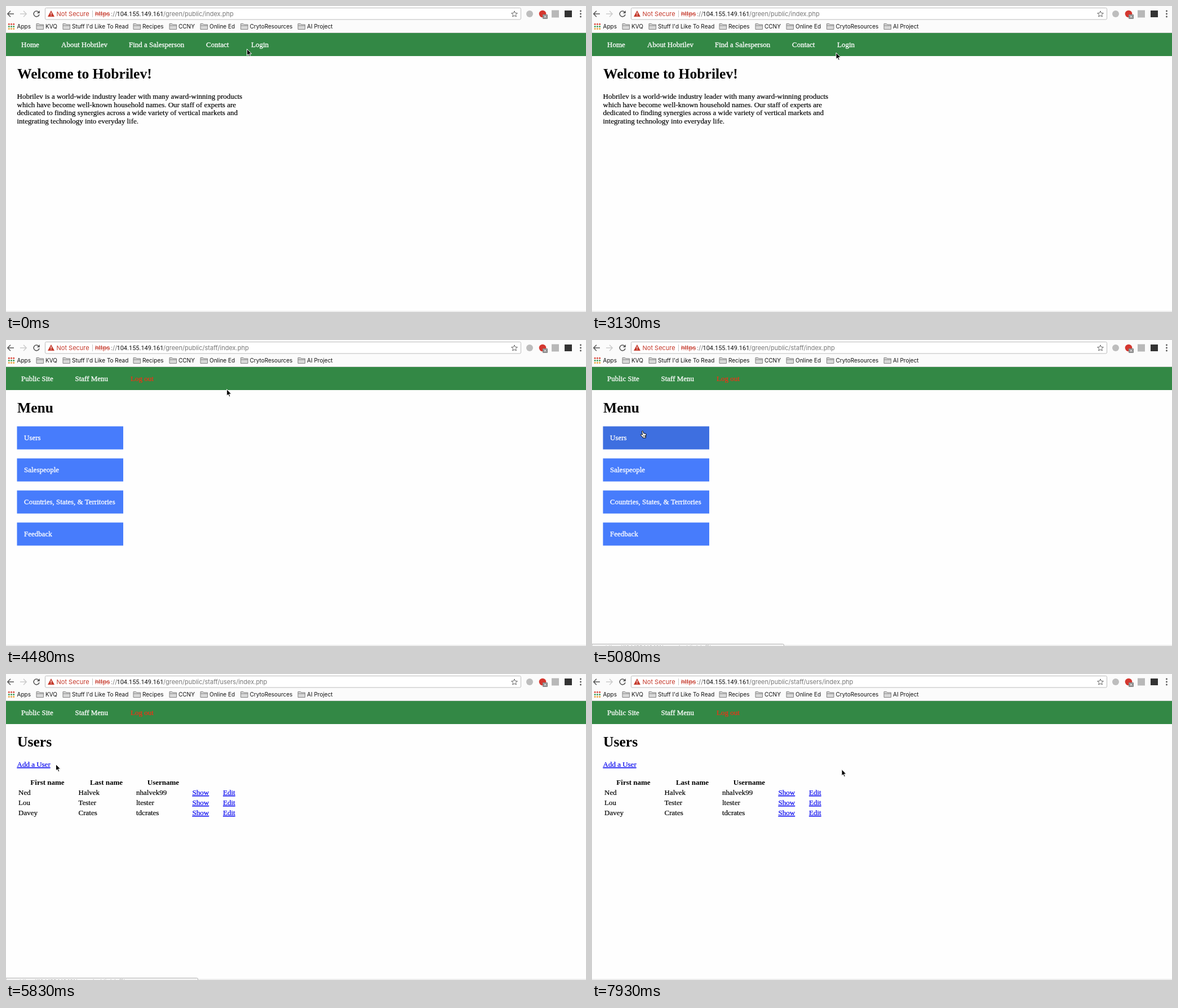
Write an HTML page that moves like this. It is 1029 by 544 pixels and loops after 8 s.

```html
<!DOCTYPE html>
<html lang="en">
<head>
<meta charset="utf-8">
<title>Staff area walkthrough</title>
<style>
html, body { margin: 0; width: 100%; height: 100%; overflow: hidden; background: #fefefe; }
svg { display: block; width: 100vw; height: 100vh; }
text { font: 13px "Liberation Serif", serif; color: #000; fill: currentColor;
  stroke: currentColor; stroke-width: .2; white-space: pre; }
.url { font: 11px Inter, sans-serif; color: #777; stroke: none; }
.host { font: 11px Roboto, sans-serif; color: #111; }
.mark { font: 10px Inter, sans-serif; color: #111; stroke: none; }
.hint { font: 9.6px Inter, sans-serif; color: #aaa; stroke: none; }
.red { color: #c5392b; }
.struck { text-decoration: line-through; }
.h1 { font-size: 25.6px; font-weight: bold; stroke: none; }
.th { font-weight: bold; text-anchor: middle; stroke: none; }
.white { color: #fff; stroke-width: .3; }
.logout { color: #fc2d14; }
.link { color: #0000ee; text-decoration: underline; }
.line { fill: none; stroke: #555; stroke-width: 1.5; }
</style>
</head>
<body>
<svg id="stage" viewBox="0 0 1029 544"></svg>
<script>
const text = (x, y, content, cls = '') =>
  `<text x="${x}" y="${y}" class="${cls}">${content}</text>`;
const rect = (x, y, w, h, fill, more = '') =>
  `<rect x="${x}" y="${y}" width="${w}" height="${h}" fill="${fill}" ${more}/>`;
const circle = (x, y, r, fill) => `<circle cx="${x}" cy="${y}" r="${r}" fill="${fill}"/>`;
const path = (d, more = 'class="line"') => `<path d="${d}" ${more}/>`;
const group = (id, ...parts) => `<g id="${id}">${parts.join('')}</g>`;
const nav = (x, label, cls = 'white') => text(x, 73, label, cls);
const cross = (x, y, r, more) =>
  path(`M${x - r} ${y - r}L${x + r} ${y + r}M${x + r} ${y - r}L${x - r} ${y + r}`, more);

const bookmark = (x, label) => text(x, 40, label, 'mark') +
  `<g transform="translate(${x - 16} 31.5)" fill="#d9d9d9" stroke="#777" stroke-width=".9">` +
  path('M0 10V0H4.5L6 1.5H12.5V10ZM0 3.5H12.5', '') + '</g>';

function star(cx, cy) {
  const points = Array.from({ length: 10 }, (_, i) => {
    const r = i % 2 ? 2.5 : 5.6, a = i * Math.PI / 5;
    return `${cx + r * Math.sin(a)},${cy - r * Math.cos(a)}`;
  });
  return `<polygon points="${points.join(' ')}" fill="none" stroke="#666"/>`;
}

const appDots = ['#d9453a', '#3c9a55', '#e9a23b'].flatMap((color, row) =>
  [0, 1, 2].map(col => circle(5.3 + col * 4.2, 32.2 + row * 4.2, 1.5, color)));

const toolbar = [
  rect(0, 0, 1029, 47, '#fbfbfb'),
  rect(0, 47, 1029, 1, '#d4d4d4'),
  path('M14 14H3M8 8.8L2.8 14L8 19.2'),
  path('M25 14H36M31 8.8L36.2 14L31 19.2', 'class="line" style="stroke:#ccc"'),
  rect(69.5, 3.5, 844, 20.5, '#fff', 'rx="2" stroke="#bcbcbc"'),
  path('M80 8L86 19H74Z', 'fill="#c5392b"'),
  path('M80 11.5V15.2M80 16.3V17.6', 'stroke="#fff" stroke-width="1.2"'),
  text(89.5, 18, 'Not Secure', 'url red'),
  rect(153, 8, 1, 12, '#c4c4c4'),
  text(158, 18, 'https', 'url red struck'),
  text(186, 18, '://', 'url'),
  text(196.5, 18, '104.155.149.161', 'url host'),
  star(902, 14.5),
  circle(929, 14, 6, '#bdbdbd'),
  circle(952, 14, 6.3, '#d4372f'),
  rect(952, 15, 9, 8, '#888', 'rx="1"'),
  cross(956.5, 19, 2.2, 'stroke="#fff"'),
  rect(968, 7.5, 13, 13, '#b8b8b8'),
  rect(991, 8, 13, 12, '#333'),
  ...[9, 14, 19].map(y => circle(1019.5, y, 1.4, '#555')),
  ...appDots,
  text(19.5, 40, 'Apps', 'mark'),
  bookmark(70, 'KVQ'), bookmark(117, "Stuff I'd Like To Read"), bookmark(242, 'Recipes'),
  bookmark(306, 'CCNY'), bookmark(361, 'Online Ed'), bookmark(432.5, 'CrytoResources'),
  bookmark(534, 'AI Project'),
].join('');

const intro = ['Hobrilev is a world-wide industry leader with many award-winning products',
  'which have become well-known household names. Our staff of experts are',
  'dedicated to finding synergies across a wide variety of vertical markets and',
  'integrating technology into everyday life.'];
const menu = ['Users', 'Salespeople', 'Countries, States, &amp; Territories', 'Feedback'];
const users = [['Ned', 'Halvek', 'nhalvek99'], ['Lou', 'Tester', 'ltester'],
  ['Davey', 'Crates', 'tdcrates']];

const home = group('home',
  text(279, 18, '/green/public/index.php', 'url'),
  nav(27, 'Home'), nav(98, 'About Hobrilev'), nav(218, 'Find a Salesperson'),
  nav(355, 'Contact'), nav(435, 'Login'),
  text(20, 129, 'Welcome to Hobrilev!', 'h1'),
  ...intro.map((row, i) => text(19.5, 165 + i * 14.7, row)));

const staffNav = group('staffNav',
  nav(27, 'Public Site'), nav(122.5, 'Staff Menu'), nav(221, 'Log out', 'logout'));

const menuPage = group('menu',
  text(279, 18, '/green/public/staff/index.php', 'url'),
  text(20, 129, 'Menu', 'h1'),
  ...menu.map((label, i) =>
    rect(19.5, 153.5 + i * 57, 188.5, 41, '#477cfc', i ? '' : 'id="usersButton"') +
    text(32, 178 + i * 57, label, 'white')));

const usersPage = group('users',
  text(279, 18, '/green/public/staff/users/index.php', 'url'),
  text(20, 129, 'Users', 'h1'),
  text(19.5, 165, 'Add a User', 'link'),
  text(73.5, 197, 'First name', 'th'),
  text(178, 197, 'Last name', 'th'),
  text(279, 197, 'Username', 'th'),
  ...users.map(([first, last, login], i) => {
    const y = 215 + i * 18;
    return text(22, y, first) + text(128.5, y, last) + text(231, y, login) +
      text(330.5, y, 'Show', 'link') + text(385, y, 'Edit', 'link');
  }));

const status = group('status',
  path('M0 544V540.5H338.5Q340.5 540.5 340.5 542.5V544', 'fill="#f3f3f3" stroke="#b5b5b5"'),
  text(24, 550, 'https://104.155.149.161/green/public/staff/', 'hint'));

// Both pointers have their tip at the group's origin.
const arrow = group('arrow',
  path('M.5.5V12L3.1 9.6L4.9 13.8L6.8 13L5 8.9H8.7Z', 'stroke="#fff"'));
const hand = group('hand',
  path('M1 7.5L0 2Q0 .6 1 .6T2 1.6L3 4.8L6.2 5.4Q7.6 5.4 7.6 7L6.8 11V13H1.6V11.8' +
    'L-1.8 8.6Q-2.7 7.4-1.8 6.9T0 7.4Z', 'fill="#fff" stroke="#000"') +
  path('M3 8.4V11M4.6 8.4V11M6 8.4V11', 'stroke="#000" stroke-width=".7"'));

document.getElementById('stage').innerHTML = toolbar +
  group('reload', path('M58.2 11A5 5 0 1 0 59 15') + path('M59.8 8V13H54.8Z', 'fill="#555"')) +
  group('stop', cross(54, 14, 4.8)) +
  rect(0, 48, 1029, 41, '#338845') + rect(0, 542.5, 1029, 1, '#dedede') +
  home + staffNav + menuPage + usersPage + status + group('cursor', arrow, hand);

const el = {};
for (const node of document.querySelectorAll('[id]')) el[node.id] = node;

const LOOP = 8000, STEP = 150, FIRST_STEP = 130;
const MENU_AT = 4480, USERS_AT = 5680;

// Turning points of the pointer: time, x, y.
const turns = [
  [0, 427, 76], [730, 451, 71], [2230, 451, 71], [3130, 432.5, 82.5], [3730, 445, 74],
  [3880, 445, 74], [4330, 441, 73.5], [4930, 122, 161], [5080, 88.5, 161], [5830, 88, 160],
  [6430, 363, 212], [7400, 1, 212], [7930, 442.5, 169]];

function pointerAt(t) {
  const next = turns.findIndex(([time]) => time > t);
  if (next < 1) return (next ? turns.at(-1) : turns[0]).slice(1);
  const [t0, x0, y0] = turns[next - 1], [t1, x1, y1] = turns[next];
  const u = (t - t0) / (t1 - t0), eased = u * u * (3 - 2 * u);
  return [x0 + (x1 - x0) * eased, y0 + (y1 - y0) * eased];
}

const within = (t, from, to) => t >= from && t < to;
const show = (id, on) => { el[id].style.display = on ? '' : 'none'; };

function draw(time) {
  const t = FIRST_STEP + Math.floor((time - FIRST_STEP) / STEP) * STEP;
  const [x, y] = pointerAt(t);
  const onHome = t < MENU_AT, onMenu = within(t, MENU_AT, USERS_AT);
  const overUsers = onMenu && x < 208 && y > 153.5;
  const overLink = overUsers || onHome && x >= 435 && y < 79;
  const loading = within(t, 4180, MENU_AT) || within(t, 5530, USERS_AT);

  el.cursor.setAttribute('transform', `translate(${x} ${y})`);
  el.usersButton.setAttribute('fill', overUsers ? '#3e6fe0' : '#477cfc');
  show('hand', overLink);
  show('arrow', !overLink);
  show('stop', loading);
  show('reload', !loading);
  show('home', onHome);
  show('staffNav', !onHome);
  show('menu', onMenu);
  show('users', t >= USERS_AT);
  show('status', overLink || within(t, USERS_AT, USERS_AT + 2 * STEP));
}

function tick() {
  draw(performance.now() % LOOP);
  requestAnimationFrame(tick);
}
tick();
</script>
</body>
</html>
```
